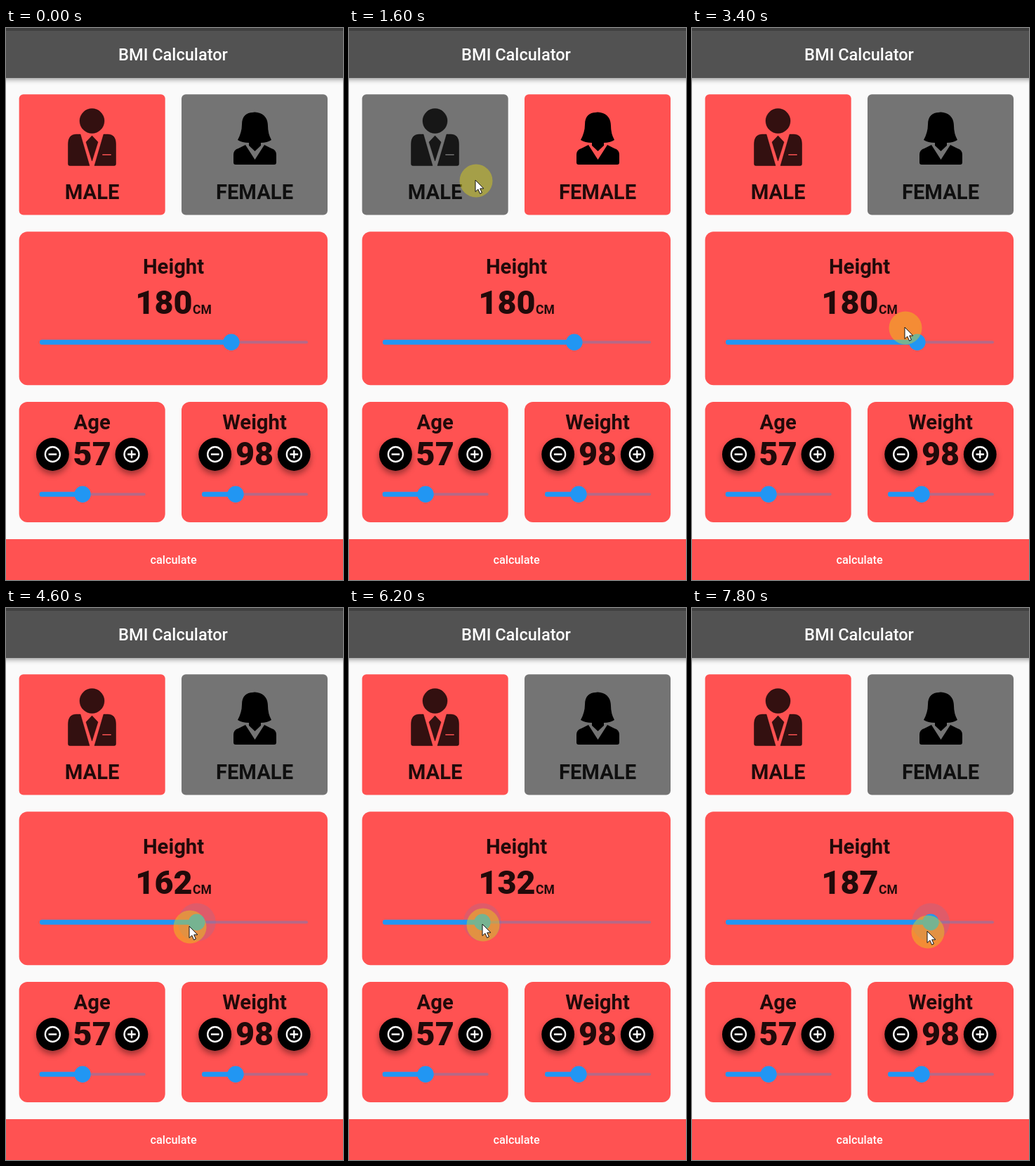
Write an HTML page with a canvas that moves like this. It is 480 px wide and 784 px high and loops after 8 s.

```html
<!DOCTYPE html>
<html lang="en">
<head>
<meta charset="utf-8">
<title>BMI Calculator</title>
<style>
  html, body { margin: 0; width: 100%; height: 100%; overflow: hidden; background: #fafafa; }
  canvas { display: block; width: 480px; height: 784px; }
</style>
</head>
<body>
<canvas id="stage"></canvas>
<script>
const W = 480, H = 784, LOOP = 8000, STEP = 200;
const RED = '#ff5252', GREY = '#747474', BLUE = '#2196f3', INK = 'rgba(0,0,0,.87)';
const LEFT = 18.67, RIGHT = 250, CARD_W = 208;
const ENTER = 800, FIRST_TAP = 1400, SECOND_TAP = 2400, GRAB = 4000, GLIDE = 600;

// The pointer visits each tap, resting before the next glide.
const taps = [
  { t: ENTER, x: 262, y: 350 },
  { t: 1600, x: 180, y: 216 },
  { t: 2600, x: 374, y: 226 },
  { t: 3400, x: 303, y: 425 },
  { t: GRAB, x: 320, y: 447 }
];
// Turning points of the height drag.
const drag = [
  { t: GRAB, x: 320, y: 447, cm: 180 },
  { t: 4600, x: 261, y: 452, cm: 162 },
  { t: 6200, x: 190, y: 449, cm: 132 },
  { t: 7400, x: 347, y: 460, cm: 190 },
  { t: 7800, x: 335, y: 459, cm: 187 }
];

const canvas = document.getElementById('stage');
const ctx = canvas.getContext('2d');
const scale = window.devicePixelRatio || 1;
canvas.width = W * scale;
canvas.height = H * scale;

const ease = k => k * k * k * (10 - 15 * k + 6 * k * k);
const mix = (a, b, k) => a + (b - a) * k;

function glide(stops, t, span = Infinity) {
  const i = stops.findIndex(s => t <= s.t);
  if (i <= 0) return stops[i < 0 ? stops.length - 1 : 0];
  const a = stops[i - 1], b = stops[i];
  const from = Math.max(a.t, b.t - span);
  const k = ease(Math.max(0, (t - from) / (b.t - from)));
  return { x: mix(a.x, b.x, k), y: mix(a.y, b.y, k), cm: mix(a.cm, b.cm, k) };
}

function rect(x, y, w, h, color, r = 0) {
  ctx.fillStyle = color;
  ctx.beginPath();
  ctx.roundRect(x, y, w, h, r);
  ctx.fill();
}

function disc(x, y, r, color) {
  ctx.fillStyle = color;
  ctx.beginPath();
  ctx.arc(x, y, r, 0, Math.PI * 2);
  ctx.fill();
}

function shape(d, fill, stroke) {
  const path = new Path2D(d);
  ctx.fillStyle = fill;
  ctx.fill(path, 'evenodd');
  if (!stroke) return;
  ctx.strokeStyle = stroke;
  ctx.lineWidth = 1;
  ctx.stroke(path);
}

function text(str, x, y, size, weight, color = INK, align = 'center') {
  ctx.font = `${weight} ${size}px Roboto, sans-serif`;
  ctx.textAlign = align;
  ctx.fillStyle = color;
  ctx.fillText(str, x, y);
}

function shadowed(color, blur, dy, draw) {
  ctx.save();
  ctx.shadowColor = color;
  ctx.shadowBlur = blur * scale;
  ctx.shadowOffsetY = dy * scale;
  draw();
  ctx.restore();
}

function slider(x0, x1, y, thumb, active) {
  rect(thumb, y - 2, x1 - thumb, 4, 'rgba(33,150,243,.32)', 2);
  rect(x0, y - 3.5, thumb - x0, 7, BLUE, 3);
  if (active) disc(thumb, y, 27, 'rgba(33,150,243,.14)');
  disc(thumb, y, 11.7, BLUE);
}

function roundButton(x, y, plus) {
  shadowed('rgba(0,0,0,.38)', 9, 5, () => disc(x, y, 23.4, '#000'));
  ctx.strokeStyle = '#fff';
  ctx.lineWidth = 2.3;
  ctx.beginPath();
  ctx.arc(x, y, 10.5, 0, Math.PI * 2);
  ctx.moveTo(x - 5.8, y);
  ctx.lineTo(x + 5.8, y);
  if (plus) {
    ctx.moveTo(x, y - 5.8);
    ctx.lineTo(x, y + 5.8);
  }
  ctx.stroke();
}

function manIcon() {
  const head = 'M105 132a17.5 17.5 0 1 0 35 0a17.5 17.5 0 1 0 -35 0Z';
  const left = 'M88.5 193V165Q88.5 151 100 151H106L119 195.5H91Q88.5 195.5 88.5 193Z';
  const right = 'M156.5 193V165Q156.5 151 145 151H139L126 195.5H154Q156.5 195.5 156.5 193Z';
  const pocket = 'M137 179H150V181H137Z';
  const tie = 'M122.5 153L131 162L122.5 189L114 162Z';
  shape(head + left + right + pocket + tie, 'rgba(0,0,0,.8)', 'rgba(0,0,0,.4)');
}

function womanIcon() {
  // Jacket, leaving an open collar below the neck
  shape('M324 191V180Q324 173 331 171L341 166L354.5 187L368 166L378 171Q385 173 385 180V191Q385 194 382 194H327Q324 194 324 191Z', '#000');
  // Hair and neck
  shape('M330 159Q336 148 336 137C336 125 343 120 351 120Q354 119 358 120C369 122 373 130 373 139Q373 150 378 159Q372 163 363 163V167L354.5 175L346 167V163Q336 163 330 159Z', '#000');
}

function numberCard(x, title, value, thumb) {
  const mid = x + CARD_W / 2;
  rect(x, 531, CARD_W, 171, RED, 12);
  text(title, mid, 570, 29.2, 700);
  text(value, mid, 621, 46.7, 900);
  roundButton(mid - 56.3, 605.5, false);
  roundButton(mid + 56.3, 605.5, true);
  slider(x + 29, x + 180, 662.3, thumb, false);
}

function heightCard(cm, active) {
  rect(LEFT, 289.3, 439.33, 218, RED, 12);
  text('Height', 238.5, 349, 29.2, 700);
  text(Math.round(cm), 265.5, 406, 46.7, 900, INK, 'right');
  text('CM', 266, 406, 17.5, 700, INK, 'left');
  slider(48, 430, 446.3, 48 + (cm - 80) / 140 * 382, active);
}

function pointer({ x, y }) {
  disc(x + 1, y + 1, 23.5, 'rgba(230,215,15,.43)');
  ctx.save();
  ctx.translate(x, y);
  shape('M0 0V16.5L3.8 13L6.6 19.3L9.4 18L6.7 12H11.8Z', '#fff', '#111');
  ctx.restore();
}

function draw(t) {
  const dragging = t >= GRAB;
  const maleGrey = t >= FIRST_TAP && t < SECOND_TAP;

  ctx.setTransform(scale, 0, 0, scale, 0, 0);
  rect(0, 0, W, H, '#fafafa');
  shadowed('rgba(0,0,0,.42)', 7, 2, () => rect(-10, 0, W + 20, 71, '#525252'));
  rect(0, 0, W, 4, '#404040');
  text('BMI Calculator', 238, 46, 23.6, 500, '#fff');

  rect(LEFT, 94.3, CARD_W, 171.2, maleGrey ? GREY : RED, 6);
  rect(RIGHT, 94.3, CARD_W, 171.2, maleGrey ? RED : GREY, 6);
  manIcon();
  womanIcon();
  text('MALE', 122.5, 243, 29.2, 700);
  text('FEMALE', 354, 243, 29.2, 700);

  heightCard(glide(drag, t).cm, dragging);
  numberCard(LEFT, 'Age', '57', 109);
  numberCard(RIGHT, 'Weight', '98', 327);

  rect(0, 726, W, 58, RED);
  text('calculate', 238.5, 761, 16.3, 500, '#fff');

  if (t >= ENTER) pointer(dragging ? glide(drag, t) : glide(taps, t, GLIDE));
}

const start = performance.now();
function frame() {
  const t = (performance.now() - start) % LOOP;
  draw(Math.floor(t / STEP) * STEP);
  requestAnimationFrame(frame);
}
frame();
</script>
</body>
</html>
```
